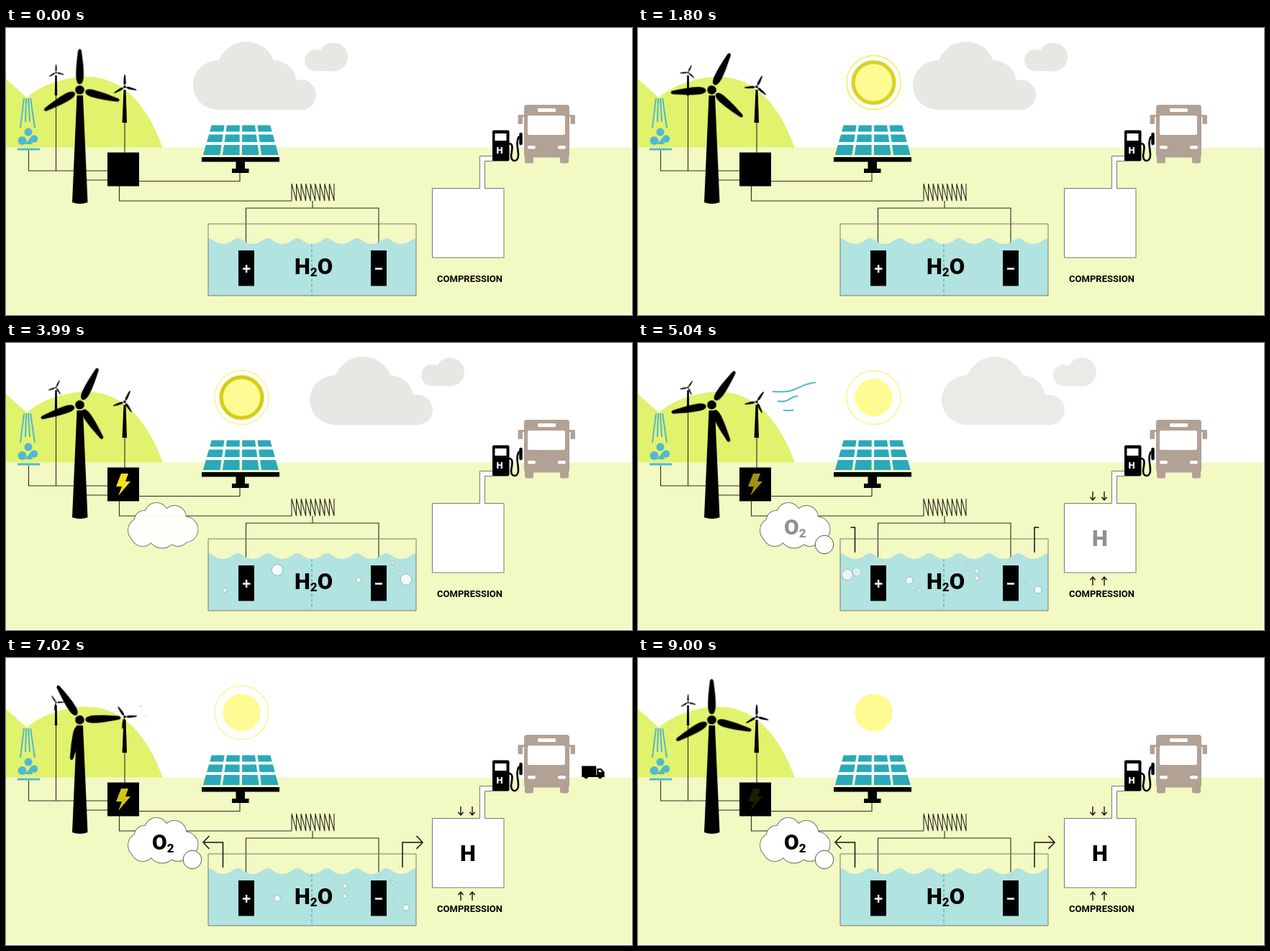
Write an HTML page that moves like this. It is 870 px wide and 400 px high and loops after 9030 ms.

```html
<!DOCTYPE html>
<html lang="en">
<head>
<meta charset="utf-8">
<title>Hydrogen from renewable power</title>
<style>
html, body { margin: 0; width: 100%; height: 100%; overflow: hidden; background: #fff; }
svg { display: block; width: 870px; height: 400px; }
text { font-family: Roboto, Arial, sans-serif; font-weight: 700; }
.formula { font-weight: 900; }
.wire { fill: none; stroke: #2b2b23; stroke-width: 1.1; }
.water-blue { fill: none; stroke: #52b9cd; stroke-width: 2; }

.anim { animation: 9030ms cubic-bezier(.37, 0, .63, 1) infinite both; }
.drift { animation-name: drift; }
.clear { animation-name: clear; }
.sunrise { animation-name: sunrise; }
.inner { animation-name: inner; }
.outer { animation-name: outer; }
.spin { animation-name: spin; transform-origin: 0 0; }
.bolt { animation-name: bolt; }
.vapour { animation-name: vapour; }
.puff { animation-name: puff; }
.press { animation-name: press; }
.label { animation-name: label; }
.flow { animation-name: flow; stroke-dasharray: 1 2; }
.head { animation-name: head; }
.gust { animation-name: gust; stroke-dasharray: 1 2; }
.truck { animation-name: truck; animation-timing-function: linear; }
.fizz { animation-name: fizz; }

@keyframes drift { 0% { transform: none } 29.9%, 100% { transform: translateX(162px) } }
@keyframes clear { 0%, 53.8% { opacity: 1 } 61.8%, 100% { opacity: 0 } }
@keyframes sunrise { 0%, 7.8% { opacity: 0 } 18.8%, 100% { opacity: 1 } }
@keyframes inner {
  0%, 22.2%, 44.4%, 66.7% { opacity: 1 }
  11.1%, 33.3%, 55.6%, 77.8%, 100% { opacity: 0 }
}
@keyframes outer {
  5.6%, 27.8%, 50%, 72.2%, 94.4%, 100% { opacity: 0 }
  0%, 16.7%, 38.9%, 61.1%, 83.3% { opacity: 1 }
}
@keyframes spin { 0%, 13.2% { transform: rotate(0deg) } 100% { transform: rotate(1800deg) } }
@keyframes bolt {
  0%, 26% { opacity: 0 }
  32.1%, 44.2%, 59.2%, 75.9%, 90.8% { opacity: 1 }
  38.2%, 51.5%, 67.3%, 83%, 100% { opacity: .12 }
}
@keyframes vapour { 0%, 37.7% { opacity: 0 } 45.4%, 100% { opacity: 1 } }
@keyframes puff { 0%, 46% { opacity: 0 } 52%, 100% { opacity: 1 } }
@keyframes press { 0%, 47% { opacity: 0 } 54%, 100% { opacity: 1 } }
@keyframes label { 0%, 51.5% { opacity: 0 } 61%, 100% { opacity: 1 } }
@keyframes flow { 0%, 46.6% { stroke-dashoffset: 1 } 62%, 100% { stroke-dashoffset: 0 } }
@keyframes head { 0%, 60.5% { opacity: 0 } 63%, 100% { opacity: 1 } }
@keyframes gust {
  0%, 49% { stroke-dashoffset: 1 }
  55.8%, 70% { stroke-dashoffset: 0 }
  78.4%, 100% { stroke-dashoffset: -1 }
}
@keyframes truck { 0%, 67% { transform: translateX(-52px) } 95.2%, 100% { transform: translateX(85px) } }
@keyframes fizz { 0%, 30% { opacity: 0 } 37%, 92% { opacity: 1 } 98%, 100% { opacity: 0 } }
</style>
</head>
<body>
<svg viewBox="0 0 870 400">
  <defs>
    <path id="blade" d="M-2.4-55Q0-59 2.4-55C4-42 6-30 5.4-18Q4.5-8 0-8Q-4.5-8-5.2-18C-5.6-30-4-42-2.4-55Z"/>
    <g id="rotor">
      <use href="#blade"/>
      <use href="#blade" transform="rotate(105)"/>
      <use href="#blade" transform="rotate(240)"/>
      <circle r="6.3"/>
    </g>
    <path id="push" d="M0 0V12M-3.6 7.8L0 12L3.6 7.8" fill="none" stroke="#111" stroke-width="1.4"/>
  </defs>

  <!-- land -->
  <path fill="#f2f9c2" d="M0 166.500H869V399H0Z"/>
  <path fill="#e1f26c" d="M0 71L29 97C50 78 85 68 112 68C165 68 198 112 218 166.500H0Z"/>

  <!-- sun and clouds -->
  <g class="anim sunrise" fill="none">
    <circle cx="327.500" cy="76" r="26.300" fill="#fffb93"/>
    <circle class="anim inner" cx="327.500" cy="76" r="28.400" stroke="#d6cd12" stroke-width="5.200"/>
    <circle class="anim outer" cx="327.500" cy="76" r="37.500" stroke="#f3e83c" stroke-width="1.600"/>
  </g>
  <g class="anim clear"><g class="anim drift" fill="#e9e7e3">
    <circle cx="294.500" cy="79.500" r="34.500"/>
    <circle cx="334" cy="60" r="41"/>
    <circle cx="372" cy="77" r="32"/>
    <circle cx="410" cy="93" r="21"/>
    <path d="M294 70H372L410 93V114H294Z"/>
    <circle cx="430" cy="45" r="15"/>
    <circle cx="455" cy="40.500" r="20"/>
    <path d="M430 40H455V60H430Z"/>
  </g></g>

  <!-- hydro -->
  <g class="water-blue">
    <path d="M25 98L20 139M28 98L27 131M31 98L33 131M34 98L40 139"/>
    <path d="M16 169H47" stroke-width="3"/>
  </g>
  <g fill="#52b9cd">
    <circle cx="31" cy="145" r="5.500"/>
    <circle cx="22.500" cy="157" r="6"/>
    <circle cx="39" cy="154.500" r="5.200"/>
    <path d="M26 162L34 153L37 162Z"/>
  </g>

  <!-- wires -->
  <path class="wire" d="M31.500 171V199H141M69.500 94V199M165 132V174M112 212H141M185 213.500H325V200M157.500 220V241H397M426 241V251M333.500 311V251H518V311"/>
  <path id="coil" class="wire" stroke-linejoin="bevel"/>

  <!-- turbines -->
  <path d="M68.300 66H70.700L71.200 94H67.800Z"/>
  <g transform="translate(69.500 62) scale(.2)"><g class="anim spin"><use href="#rotor"/></g></g>
  <path d="M163.500 86H166.500L168 132H161.500Z"/>
  <g transform="translate(165 82) scale(.3)"><g class="anim spin"><use href="#rotor"/></g></g>
  <path d="M98.500 94H107L113.500 243Q103 247 92 243Z"/>
  <g transform="translate(102.500 86.300)"><g class="anim spin"><use href="#rotor"/></g></g>

  <g class="water-blue">
    <path class="anim gust" pathLength="1" d="M247 55C234 56 228 60 218 64.500C208 69 198 68 187 67.500"/>
    <path class="anim gust" pathLength="1" d="M222 74C214 74 211 80 204 81Q199 82 194 81"/>
    <path class="anim gust" pathLength="1" d="M216 93.500Q208 95 202 93.500"/>
  </g>

  <!-- converter and solar panel -->
  <path d="M141 173.500H185V220.500H141Z"/>
  <path class="anim bolt" fill="#f9e11e" d="M160 182H170L166 193H173L156 213L161 200H153Z"/>
  <path id="cells" fill="#2aa9b9"/>
  <path d="M272 180H380V186.500H332V196H337.500V202H314V196H319.500V186.500H272Z"/>

  <!-- electrolysis tank -->
  <path id="water" fill="#b1e3e0"/>
  <path d="M425 301V372" stroke="#5aa9ad" stroke-width="1.200" stroke-dasharray="4 3"/>
  <g id="bubbles" class="anim fizz" fill="#fff" stroke="#8f9a9a" stroke-width=".8"></g>
  <path d="M281 273H570V373H281Z" fill="none" stroke="#777a6c"/>
  <path d="M323 310H345V359.500H323ZM507 310H529V359.500H507Z"/>
  <path d="M329 335.500H339.500M334.200 330V341M513 335.500H523" stroke="#fff" stroke-width="2.400"/>
  <text class="formula" x="401" y="342.500" font-size="31">H<tspan font-size="17" dy="3">2</tspan><tspan dy="-3">O</tspan></text>

  <!-- gas outlets -->
  <g class="wire" style="stroke:#111;stroke-width:1.500">
    <path class="anim flow" pathLength="1" d="M301.500 292V257H274"/>
    <path class="anim flow" pathLength="1" d="M551 292V257H579"/>
    <path class="anim head" d="M282.500 248L274 257L282.500 266M570.500 248L579 257L570.500 266"/>
  </g>
  <g id="vapour" class="anim vapour"></g>
  <circle class="anim puff" cx="259" cy="281" r="12.800" fill="#fff" stroke="#555"/>
  <text class="anim label formula" x="203" y="266.500" font-size="30">O<tspan font-size="17" dy="4">2</tspan></text>

  <!-- compressor -->
  <path fill="#fff" stroke="#77786c" d="M592.500 223.500H658.500V178.500H677V185.500H665.500V223.500H692V320H592.500Z"/>
  <text class="anim label formula" x="642" y="283" font-size="31" text-anchor="middle">H</text>
  <g class="anim press">
    <use href="#push" x="632" y="207"/>
    <use href="#push" x="648" y="207"/>
    <use href="#push" transform="translate(632 338) scale(1 -1)"/>
    <use href="#push" transform="translate(648 338) scale(1 -1)"/>
  </g>
  <text x="644.500" y="353.500" font-size="13" text-anchor="middle">COMPRESSION</text>

  <!-- road -->
  <g class="anim truck">
    <path d="M800 150.500H820V163H821V154H827L831.500 159V166H800Z"/>
    <circle cx="806" cy="165.500" r="2.700"/>
    <circle cx="825.500" cy="165.500" r="2.700"/>
    <path d="M823.500 156H826L828 159H823.500Z" fill="#fff"/>
  </g>
  <g fill="#b2a195">
    <rect x="720" y="107" width="63" height="73.500" rx="4"/>
    <path d="M721 179H733V186Q733 188.500 730 188.500H724Q721 188.500 721 186ZM770 179H782V186Q782 188.500 779 188.500H773Q770 188.500 770 186Z"/>
    <rect x="711.500" y="121" width="6.500" height="13" rx="1.500"/>
    <rect x="784.500" y="121" width="6.500" height="13" rx="1.500"/>
    <path d="M714 121H789V124H714Z"/>
  </g>
  <g fill="#fff">
    <rect x="739" y="112" width="25" height="5" rx="1"/>
    <rect x="725" y="122" width="52" height="27" rx="2.500"/>
    <rect x="725" y="164" width="11" height="4.500" rx="2"/>
    <rect x="767" y="164" width="11" height="4.500" rx="2"/>
  </g>
  <path d="M699 161C706 161 703 170 702 178C702 188 712 187 712 177C712 168 708 160 713 151" fill="none" stroke="#000" stroke-width="2.600"/>
  <path d="M715.500 148V161" stroke="#000" stroke-width="4.500" stroke-linecap="round"/>
  <rect x="676" y="142.500" width="23.500" height="43" rx="2"/>
  <rect x="679.500" y="147" width="16" height="10" fill="#fff"/>
  <text class="formula" x="686" y="174.500" font-size="13" fill="#fff" text-anchor="middle">H</text>
</svg>

<script>
const LOOP = 9030, RISE = 2352, RISE_START = 4090;
const $ = id => document.getElementById(id);

function addCircle(parent, attrs) {
  const c = document.createElementNS('http://www.w3.org/2000/svg', 'circle');
  for (const k in attrs) c.setAttribute(k, attrs[k]);
  return parent.appendChild(c);
}

// Coil: sawtooth with nine teeth
let coil = 'M397 241V217';
for (let i = 1; i <= 9; i++) coil += `L${397 + i * 6.55} 241V217`;
$('coil').setAttribute('d', coil + 'V241');

// Solar cells on a trapezoid
const edge = (col, y, gap) => {
  const k = (y - 135.5) / 42, left = 284 - 12 * k, right = 369 + 11.5 * k;
  return left + (right - left) * col / 4 + gap;
};
let cells = '';
for (const [top, bottom] of [[135.5, 144.5], [148.5, 159], [163, 177]])
  for (let c = 0; c < 4; c++)
    cells += `M${edge(c, top, 1.7)} ${top}H${edge(c + 1, top, -1.7)}` +
      `L${edge(c + 1, bottom, -1.7)} ${bottom}H${edge(c, bottom, 1.7)}Z`;
$('cells').setAttribute('d', cells);

$('water').setAttribute('d',
  'M281 293' + 'c6 0 10 8 20.640 8s14.640-8 20.640-8'.repeat(7) + 'V373H281Z');

// Oxygen cloud: outlined lobes, then the same lobes in white on top
const lobes = [[187, 261, 17], [192, 247, 13], [209, 239, 16], [234, 243, 16],
  [249, 260, 17.5], [190, 267, 16], [217, 266, 19.5], [239, 268, 15]];
for (const paint of [{ stroke: '#777', 'stroke-width': 2 }, { fill: '#fff' }])
  for (const [cx, cy, r] of lobes) addCircle($('vapour'), { cx, cy, r, ...paint });

// Bubbles: x, height and radius at phase .4, rise, growth, phase window, strength
const bubbles = [
  [377, 331, 5, 26, 5, 0, 1, .85],
  [556, 344, 5, 26, 5, 0, 1, .85],
  [537, 335, 1, 32, 2, 0, 1, .6],
  [537, 317, 2, 20, 1, .6, 1, .5],
  [537, 310, 2.3, 20, 1, .1, .33, .7],
  [471, 317.5, 3.5, 0, 0, .16, .55, .6],
  [471, 328, 3.3, 26, 1, .15, .75, .8],
  [459.5, 306, 2, 4, 0, .15, .6, .5],
  [291, 323, 7.5, 26, 4, .3, .65, .7],
  [304, 319, 6, 26, 4, .3, .65, .5],
  [304, 359, 2, 26, 2, .7, 1, .8],
  [390, 345, 2.5, 26, 2, .3, .65, .5],
  [490, 345, 2.5, 26, 2, .65, 1, .8]
].map(b => [addCircle($('bubbles'), { cx: b[0] }), ...b.slice(1)]);

const clamp = v => Math.max(0, Math.min(1, v));
let start;

function frame(now) {
  start ??= now;
  const t = (now - start) % LOOP;
  const p = ((t - RISE_START) / RISE + 2) % 1;
  for (const [el, y, r, rise, grow, from, to, alpha] of bubbles) {
    const d = p - .4;
    el.setAttribute('cy', y - rise * d);
    el.setAttribute('r', Math.max(.5, r + grow * d));
    el.setAttribute('opacity', alpha * clamp(Math.min(p - from, to - p) / .03));
  }
  requestAnimationFrame(frame);
}
requestAnimationFrame(frame);
</script>
</body>
</html>
```
